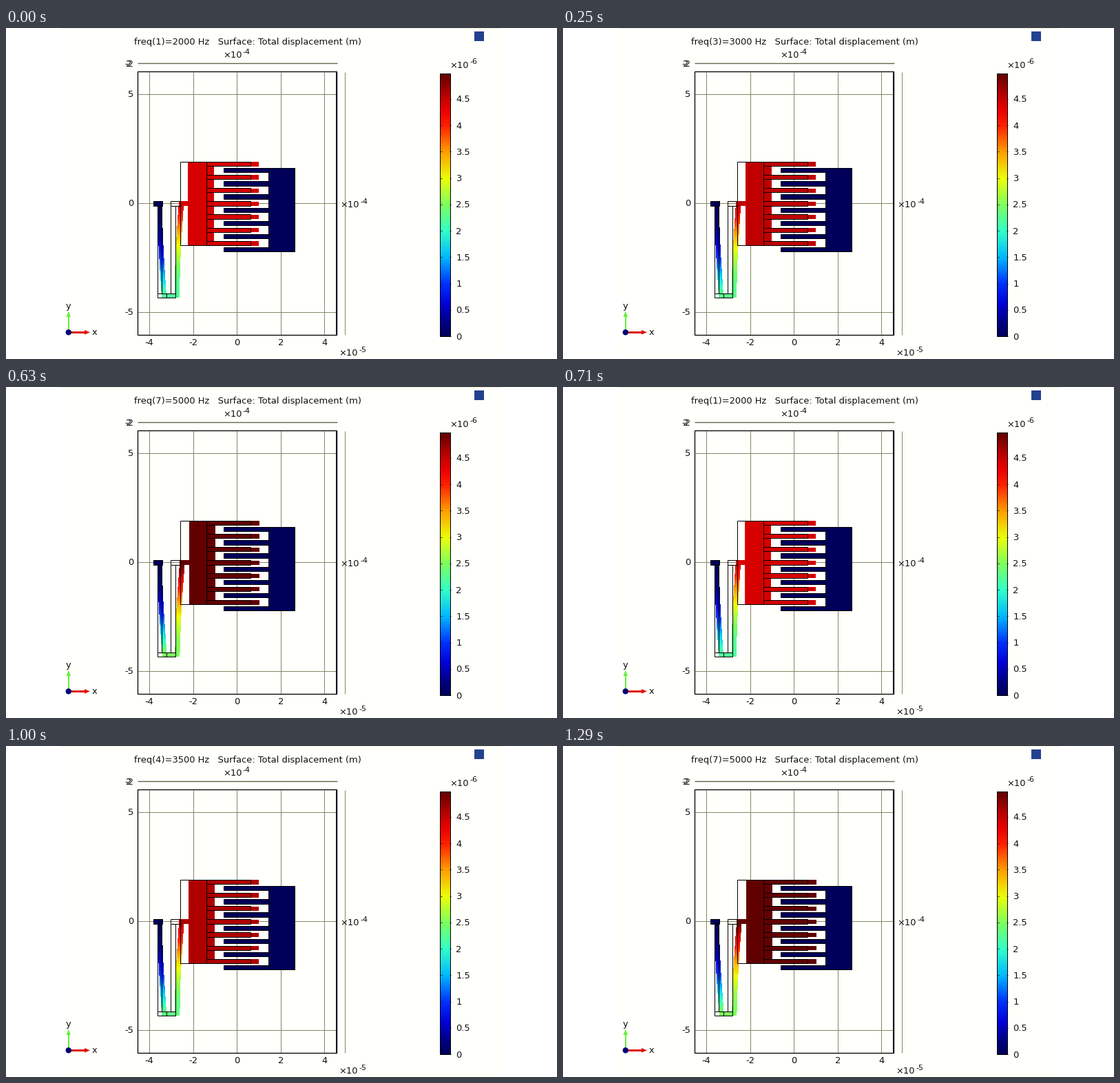
A matplotlib script for the animation above (1.33 s loop, 800 by 480 pixels).

```python
import numpy as np
import matplotlib.pyplot as plt
from matplotlib.animation import FuncAnimation
from matplotlib.collections import LineCollection, PolyCollection
from matplotlib.colors import LinearSegmentedColormap
from matplotlib.patches import Circle, Polygon, Rectangle

W, H, DPI = 800, 480, 100
PT = 72 / DPI                      # points per pixel
LOOP, TICK, FPS = 1330, 10, 24
SWEEP = 16                         # video frames in one frequency sweep
U_MAX = 4.97                       # top of the colour scale, micrometres
HALF = 0.5                         # line snapping rounds half pixels up
PAPER, GRID, NAVY = "#fffffc", "#868664", "#00005a"

plt.rcParams["font.family"] = "DejaVu Sans"

STOPS = [(0, (0, 0, 90)), (.05, (0, 0, 130)), (.12, (0, 0, 215)),
         (.2, (0, 50, 255)), (.3, (0, 185, 255)), (.4, (50, 255, 200)),
         (.5, (125, 255, 95)), (.6, (235, 255, 10)), (.7, (255, 160, 0)),
         (.8, (255, 35, 0)), (.86, (235, 0, 0)), (.9, (205, 0, 0)),
         (1, (98, 0, 0))]
rainbow = LinearSegmentedColormap.from_list(
    "rainbow", [(p, np.array(c) / 255) for p, c in STOPS], N=512)

fig = plt.figure(figsize=(W / DPI, H / DPI), dpi=DPI, facecolor="white")
ax = fig.add_axes([0, 0, 1, 1])
ax.axis("off")


def box(x0, y0, x1, y1, color, z=1):
    ax.add_patch(Rectangle((x0, y0), x1 - x0, y1 - y0, fc=color, lw=0, zorder=z))


def frame(x0, y0, x1, y1, z=6, width=1):
    ax.add_patch(Rectangle((x0 - HALF, y0 - HALF), x1 - x0, y1 - y0, fill=False,
                           ec="black", lw=width * PT, zorder=z))


def lines(segments, color="black", width=1, z=2):
    ax.add_collection(LineCollection(np.array(segments) - HALF, colors=color,
                                     linewidths=width * PT, zorder=z),
                      autolim=False)


def label(x, y, text, ha="left", size=13):
    """Write text with its digits centred on height y."""
    return ax.text(x, y + 0.365 * size, text, ha=ha, va="baseline",
                   fontsize=size * PT, color="#101010", zorder=8)


def power(x, y, exponent):
    label(x, y, "×10")
    label(x + 28.5, y - 4.5, exponent, size=11)


def rect(x0, y0, x1, y1):
    return [(x0, y0), (x1, y0), (x1, y1), (x0, y1)]


# Paper and plot frame
box(80, 0, 720, H, PAPER, 0)
box(80, 0, 720, 1, "#f1f1da", 0.5)
box(680, 5, 694, 19, "#23418f")

grid_x = [208.5 + 63.6 * i for i in range(5)]
grid_y = [96.5, 254.5, 412.5]
lines([[(x, 64), (x, 445)] for x in grid_x], GRID)
lines([[(192, y), (480, y)] for y in grid_y], GRID)
lines([[(191, 51.5), (481, 51.5)]], "#66664c", 1.4)
lines([[(492, 64), (492, 445)]], GRID)
frame(191.5, 63.5, 480.5, 445.5, 3, 1.3)
lines([[(480.5, 63), (480.5, 446)]], "#000018", 2, 3)

for x, text in zip(grid_x, ["-4", "-2", "0", "2", "4"]):
    label(x - 0.5, 455.5, text, "center")
for y, text in zip(grid_y, ["5", "0", "-5"]):
    label(185.3, y - 1, text, "right")
label(185.3, 51, "-2", "right")
label(182.3, 51, "2", "right")
power(315, 38.3, "-4")
power(485.5, 255.7, "-4")
power(483.5, 470.3, "-5")
title = label(185.7, 19.3, "", size=13.05)

# Colour bar
ax.imshow(np.linspace(1, 0, 380)[:, None], cmap=rainbow, vmin=0, vmax=1,
          extent=[630, 646, 447.5, 67], aspect="auto", zorder=2)
frame(630.5, 66.5, 645.5, 447.5)
power(644.5, 52.8, "-6")
for i in range(10):
    y = 447.5 - 38.25 * i
    label(653.2, y - 0.5, f"{i / 2:g}")
    lines([[(631, y), (633, y)], [(644, y), (646, y)]], "#202020", 1, 5)

# Axis triad
box(91, 440, 116, 442.5, "#dc1400", 2)
box(89.5, 417, 92, 441, "#66f03c", 2)
ax.add_patch(Polygon([(114, 438), (122, 441.3), (114, 444.6)], fc="#dc1400", lw=0))
ax.add_patch(Polygon([(87.5, 419), (90.8, 410.5), (94, 419)], fc="#66f03c", lw=0))
ax.add_patch(Circle((90.8, 441.3), 4.2, fc="#000078", lw=0, zorder=4))
label(125, 440.5, "x")
label(86.3, 402, "y")

# Comb geometry
PITCH, THICK, TOP, FOOT = 19.15, 6.3, 258, 385
left_teeth = [194.3 + PITCH * i for i in range(7)]
right_teeth = [203.6 + PITCH * i for i in range(7)]

box(381, 203.5, 420, 324.5, NAVY, 4)
frame(381, 203.5, 419.5, 324)
for y in right_teeth:
    box(316, y, 381, y + THICK, NAVY, 4)
    frame(316, y, 381, y + THICK)
box(214, 251, 227.5, 258, NAVY, 4)
frame(214.5, 251.5, 227, 258)

# Rest position
frame(220.5, 258, 226.5, 385.5)
frame(239.5, 258, 246, 385.5)
frame(220.5, 385.5, 246, 391)
lines([[(233.5, 385), (233.5, 391)]], z=6)
frame(239.5, 251.5, 253, 258)
frame(253, 194.5, 291, 315.3)
for y in left_teeth:
    frame(291, y, 355.5, y + THICK)

# Moving parts, each with its share of the full displacement
CELLS = 64
edges = np.linspace(0, 1, CELLS + 1)
parts = [(rect(253, 194.3, 291, 315.5), 1, 1),
         (rect(239.5, 251, 253.5, 258), 1, 1),
         (rect(220.5, 385, 246, 391), .5, .5)]
parts += [(rect(290, y, 355.5, y + THICK), 1, 1) for y in left_teeth]


def bend(s):
    return (3 * s * s - s ** 3) / 2


for s0, s1 in zip(edges[:-1], edges[1:]):
    y0, y1 = TOP + (FOOT - TOP) * s0, TOP + (FOOT - TOP) * s1
    parts.append((rect(220.5, y0, 226.5, y1), bend(s0) / 2, bend(s1) / 2))
    parts.append((rect(239.5, y0, 246, y1),
                  .5 + bend(1 - s0) / 2, .5 + bend(1 - s1) / 2))

rest = np.array([p[0] for p in parts], float)
share = np.array([[a, a, b, b] for _, a, b in parts])
body = PolyCollection(rest, antialiaseds=False, linewidths=0, zorder=4)
ax.add_collection(body, autolim=False)

ax.set_xlim(0, W)
ax.set_ylim(H, 0)


def response(hz):
    """Displacement in micrometres, below resonance."""
    return 4.306 / (1 - (hz / 1000) ** 2 / 187)


def draw(i):
    k = (i * TICK + 4) * FPS // 1000
    step = round(0.4 * (k % SWEEP))
    hz = 2000 + 500 * step
    u = response(hz)
    shape = rest.copy()
    shape[..., 0] += 2.6 * u * share
    body.set_verts(shape)
    body.set_facecolor(rainbow(u * share.mean(axis=1) / U_MAX))
    title.set_text(f"freq({step + 1})={hz} Hz   Surface: Total displacement (m)")
    return body, title


anim = FuncAnimation(fig, draw, frames=LOOP // TICK, interval=TICK,
                     repeat=True, repeat_delay=0, blit=False)
plt.show()
```
